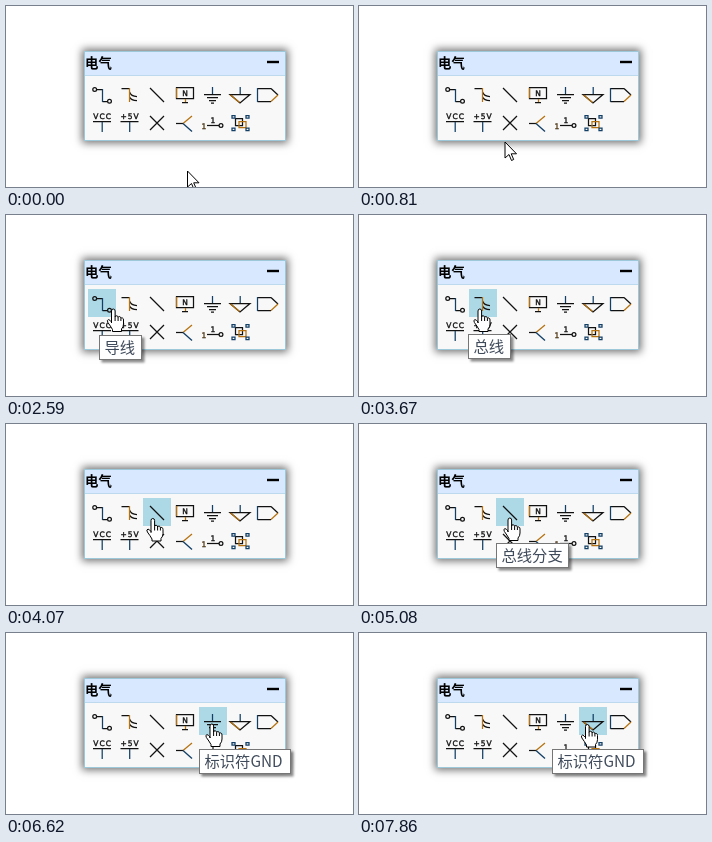
Animation of 347 by 181 pixels, one loop 8 s. Source, as an HTML page:

```html
<!DOCTYPE html>
<html lang="zh">
<head>
<meta charset="utf-8">
<style>
html, body { margin: 0; width: 100%; height: 100%; overflow: hidden; background: #fff; }
#stage { position: relative; width: 347px; height: 181px; overflow: hidden; }
#panel { position: absolute; left: 78px; top: 45px; width: 202px; height: 90px; box-sizing: border-box;
  background: #f8f8f8; border: 1px solid #9cc8da; box-shadow: 0 0 8px 2px #707070; }
#header { height: 23px; background: #d8e8fe; border-bottom: 1px solid #bcd9ee; }
svg { position: absolute; left: 0; top: 0; }
text { font-family: "Noto Sans CJK SC", "Noto Sans CJK", sans-serif; }
#icons { fill: none; stroke: #111; stroke-width: 1.25; }
#icons text { font: 7.5px "DejaVu Sans", sans-serif; fill: #111; stroke-width: .35; text-anchor: middle; letter-spacing: 1px; }
#icons .blue { stroke: #123f66; }
#icons .gold { stroke: #b5720f; }
#tip rect { fill: #fff; stroke: #767676; }
#tip text { font-size: 15.3px; font-weight: 300; fill: #3f4a5a; }
#hand, #arrow { fill: #fff; stroke: #000; stroke-linejoin: round; }
</style>
</head>
<body>
<div id="stage">
  <div id="panel"><div id="header"></div></div>
  <svg width="347" height="181" viewBox="0 0 347 181">
    <defs><filter id="shade" x="-10%" y="-20%" width="125%" height="150%">
      <feDropShadow dx="2.5" dy="2.5" stdDeviation="1" flood-opacity=".45"/>
    </filter></defs>
    <text x="79" y="61.5" font-size="13.4" font-weight="bold">电气</text>
    <path d="M261 56H273" stroke="#000" stroke-width="2.4"/>
    <rect id="hover" width="28" height="28" fill="#add8e6"/>
    <g id="icons">
      <!-- wire -->
      <path d="M91 83.5H96.5M96.5 95.5H101"/><path class="blue" d="M96.5 83V96"/>
      <circle cx="88.7" cy="83.5" r="1.9"/><circle cx="103.5" cy="95.3" r="1.9"/>
      <!-- bus -->
      <path d="M115.5 82.5H123M123.5 86Q125 90.5 131 90.5M123.5 91Q125 94.5 131 94.5"/><path class="gold" d="M123.5 82V96"/>
      <!-- bus entry -->
      <path d="M144 82L158 96"/>
      <!-- net label -->
      <path d="M170.5 92.5V81.5H187.5V92.5ZM176 96.5H182"/><path class="gold" d="M170.5 82V92M179.5 93V96"/>
      <text x="179.6" y="90" font-weight="bold">N</text>
      <!-- grounds -->
      <path d="M198 88.5H215M201 91.5H212M203 94.5H210M205 97H208"/><path class="blue" d="M206.5 81V88"/>
      <path d="M224 88.5H244L234 97Z"/><path class="blue" d="M234.2 81V88"/><path class="gold" d="M224.5 89L233.5 96.5"/>
      <!-- port -->
      <path d="M251.5 82.5H265M265 95.5H251.5M265 82.5L272 89"/><path class="blue" d="M251.5 82V96"/><path class="gold" d="M272 89L265 95.5"/>
      <!-- power rails -->
      <path d="M87 115.5H105M114.5 115.5H132.5"/><path class="blue" d="M96.2 116V126M123.7 116V126"/>
      <text x="96.6" y="113">VCC</text><text x="124" y="113">+5V</text>
      <!-- no connect, split -->
      <path d="M144 110L158 124M158 110L144 124"/>
      <path d="M170 117.5H177"/><path class="gold" d="M186 110L177 117.5"/><path class="blue" d="M177 117.5L186 125.5"/>
      <!-- pin -->
      <path d="M201 119.5H213"/><circle cx="215" cy="119.5" r="1.9"/>
      <text x="198.3" y="122.5" style="fill:#b5720f">1</text><text x="207.5" y="117">1</text>
      <!-- group -->
      <path d="M229.5 112.5H236.5V119.5H229.5Z"/><path class="gold" d="M233 115.5H240V121.5H233Z"/>
      <path class="blue" d="M226 109.5H229V112H226ZM240 109.5H243V112H240ZM226 122H229V124.5H226ZM240 122H243V124.5H240Z"/>
    </g>
    <g id="tip"><rect height="24" filter="url(#shade)"/><text x="5" y="17"></text></g>
    <g id="cursor">
      <path id="arrow" d="M0 0V16L4 12.5 6.5 18.5 8.7 17.5 6.2 11.8H11.5Z"/>
      <path id="hand" d="M-2 14V2Q-2 0 -.2 0T1.6 2V8Q1.6 6.5 3.2 6.8T4.6 8.5Q5 7.3 6.2 7.6T7.4 9.4Q8 8.6 9 9T10 11V15Q10 18 8 20V22.5H-1V20.5Q-3 17 -5.6 13.5Q-7 11 -5 10.6Q-3.6 10.8 -2 13ZM1.6 8V12M4.6 8.5V12M7.4 9.4V12"/>
    </g>
    <circle id="click" cx="181.5" cy="165.5" r="12" fill="#ff0" fill-opacity=".47"/>
  </svg>
</div>
<script>
const LOOP = 8000, CELL = 27.65, GRID = { x: 82, y: 74, row: 28.5 };
const START = [181.5, 165];
// first step, last step, step count, destination
const moves = [
  [580, 1180, 9, 96.5, 95],
  [2430, 2590, 3, 107.5, 94],
  [2660, 2740, 2, 119.5, 94],
  [3670, 4150, 7, 148.5, 94.5],
  [5080, 5450, 6, 181.5, 91],
  [6230, 6620, 6, 206, 91],
  [7700, 7860, 3, 228.5, 91.5]
];
// show, hide, left, top, width, label
const tips = [
  [1730, 2660, 93.5, 120.5, 42, "导线"],
  [2740, 3910, 109.5, 119.5, 42, "总线"],
  [4150, 5230, 137.5, 119.5, 72, "总线分支"],
  [5450, 6390, 165.5, 116.5, 72, "网络标签"],
  [6620, LOOP, 193.5, 116.5, 91, "标识符GND"]
];
const $ = id => document.getElementById(id);
const show = (el, visible) => el.setAttribute("visibility", visible ? "visible" : "hidden");
const place = (el, x, y) => el.setAttribute("transform", `translate(${x} ${y})`);
const smooth = p => p * p * (3 - 2 * p);

function cursorAt(t) {
  let [x, y] = START;
  for (const [from, to, steps, endX, endY] of moves) {
    if (t < from) break;
    const step = Math.min(steps, 1 + Math.floor((t - from) / (to - from) * (steps - 1) + 1e-6));
    const p = smooth(step / steps);
    x += (endX - x) * p;
    y += (endY - y) * p;
  }
  return [x, y];
}

function drawTip(t) {
  const tip = tips.find(([from, to]) => t >= from && t < to);
  show($("tip"), tip);
  if (!tip) return;
  const [from, , x, y, width, label] = tip;
  const fade = tip === tips[0] ? Math.min(1, (1 + Math.floor((t - from) / 85)) / 3) : 1;
  place($("tip"), x, y);
  $("tip").setAttribute("opacity", fade);
  $("tip").firstChild.setAttribute("width", width);
  $("tip").lastChild.textContent = label;
}

function draw(t) {
  const [x, y] = cursorAt(t);
  const col = Math.floor((x - GRID.x) / CELL), row = Math.floor((y - GRID.y) / GRID.row);
  const over = row >= 0 && row < 2 && col >= 0 && col < (row ? 6 : 7);
  show($("hover"), over);
  $("hover").setAttribute("x", Math.round(GRID.x + col * CELL));
  $("hover").setAttribute("y", Math.round(GRID.y + row * GRID.row));
  show($("hand"), over);
  show($("arrow"), !over);
  place($("cursor"), Math.round(x * 2) / 2, Math.round(y * 2) / 2);
  show($("click"), t >= 270 && t < 430);
  drawTip(t);
}

const begin = performance.now();
function frame() {
  draw((performance.now() - begin) % LOOP);
  requestAnimationFrame(frame);
}
frame();
</script>
</body>
</html>
```
